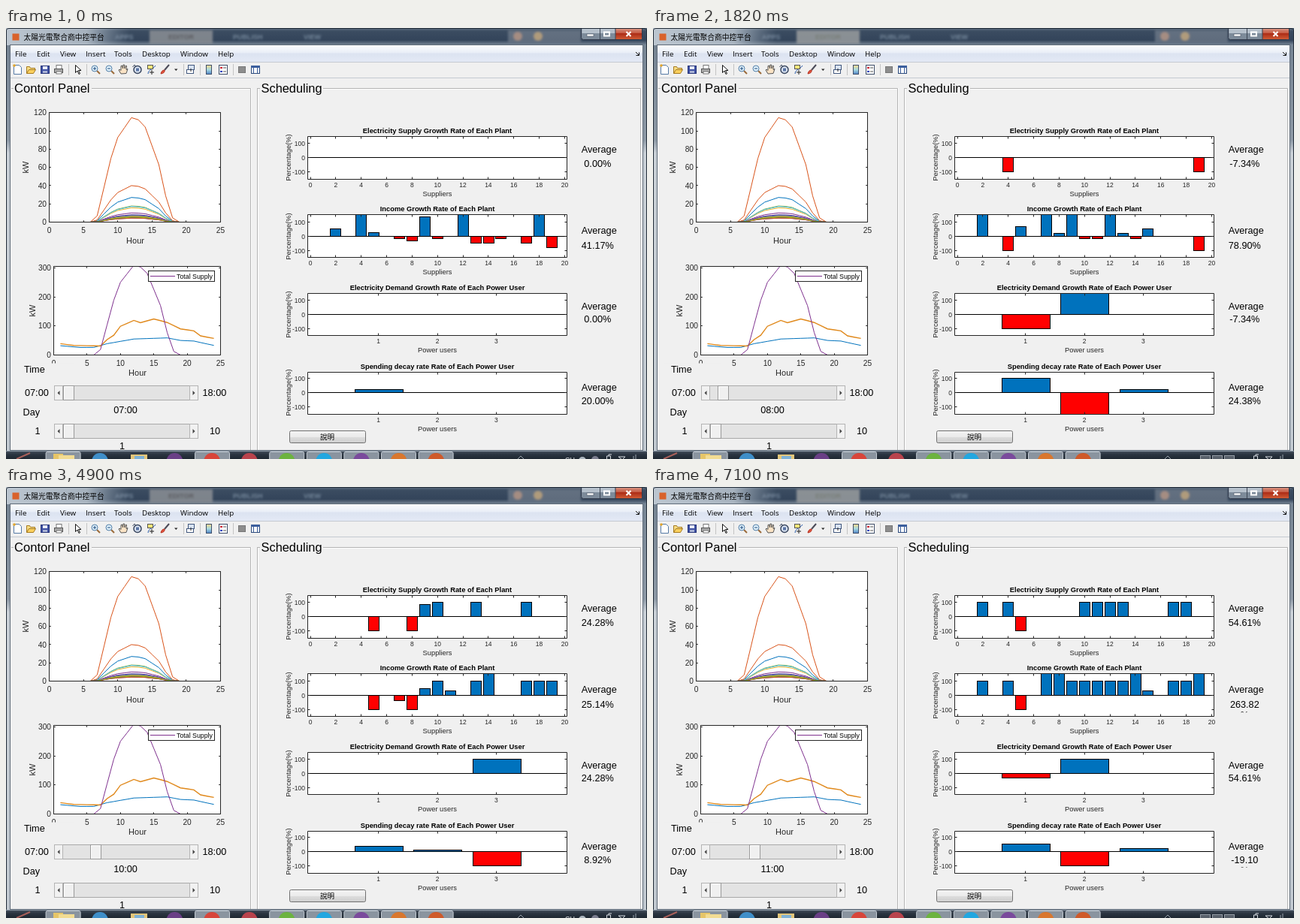
These frames come from a looping animation (853x574 px, 8000 ms). An HTML page:

```html
<!DOCTYPE html>
<html lang="zh-Hant">
<head>
<meta charset="utf-8">
<title>太陽光電聚合商中控平台</title>
<style>
html, body { margin: 0; width: 100%; height: 100%; overflow: hidden; background: #f0f0f0; }
svg { display: block; width: 853px; height: 574px; font-family: "Liberation Sans", Arial, sans-serif; }
.ui { font-family: "Open Sans", sans-serif; }
.cjk { font-family: "Noto Sans CJK TC", "Noto Sans CJK", "Noto Sans CJK JP", sans-serif; }
</style>
</head>
<body>
<svg id="stage" viewBox="0 0 853 574" xmlns="http://www.w3.org/2000/svg"></svg>
<script>
const LOOP = 8000, FIRST = 500, HOLD = 2200;
const COLORS = ['#0072bd', '#d95319', '#edb120', '#7e2f8e', '#77ac30', '#4dbeee', '#a2142f'];
const INK = '#262626', FULL = 100, OVER = 150;

// Same percentage for several bars.
const all = (v, ...ids) => Object.fromEntries(ids.map(i => [i, v]));

// One entry per hour; income follows supply except where "extra" differs.
const HOURS = [
  { supply: {}, demand: {}, spend: { 1: 20 },
    extra: { 2: 50, 5: 25, 8: -34, 9: 135, 19: -77, ...all(OVER, 4, 12, 18), ...all(-18, 7, 10, 15), ...all(-47, 13, 14, 17) },
    avg: [0, 41.17, 20] },
  { supply: all(-FULL, 4, 19), demand: { 1: -FULL, 2: OVER }, spend: { 1: FULL, 2: -OVER, 3: 20 },
    extra: { 5: 66, 15: 50, ...all(22, 8, 13), ...all(OVER, 2, 7, 9, 12), ...all(-18, 10, 11, 14) },
    avg: [-7.34, 78.9, 24.38] },
  { supply: { ...all(-FULL, 2, 7, 11, 14, 19), ...all(FULL, 8, 9) }, demand: { 1: FULL, 3: -FULL },
    spend: { 1: -FULL, 2: 30, 3: FULL }, extra: { 5: FULL }, avg: [61.22, 116.3, -13.52] },
  { supply: { ...all(-FULL, 5, 8), 9: 83, ...all(FULL, 10, 13, 17) }, demand: { 3: FULL },
    spend: { 1: 38, 2: 13, 3: -FULL }, extra: { 7: -38, 9: 47, 11: 33, 14: OVER, ...all(FULL, 18, 19) },
    avg: [24.28, 25.14, 8.92] },
  { supply: { ...all(FULL, 2, 4, 10, 11, 12, 13, 17, 18), 5: -FULL }, demand: { 1: -30, 2: FULL },
    spend: { 1: 54, 2: -FULL, 3: 20 }, extra: { ...all(OVER, 7, 8, 14, 19), 9: FULL, 15: 33 },
    avg: [54.61, 263.82, -19.1] }
];

// Key points over the day, [hour, value], joined by straight lines.
const SUN = [[6, 0], [7, .06], [9, .61], [10, .81], [12, 1], [13, .98], [14, .91], [16, .55], [17, .25], [18, .04], [19, 0]];
const USE_A = [[1, 32], [4, 26], [6, 26], [8, 39], [12, 55], [17, 59], [19, 50], [21, 48], [24, 33]];
const USE_B = [[1, 39], [3, 33], [7, 31], [8, 53], [9, 68], [10, 99], [12, 119], [13, 111], [15, 124], [17, 112], [19, 90], [21, 83], [22, 66], [24, 57]];

function along(keys, h) {
  const i = keys.findIndex(k => k[0] >= h);
  if (i < 1) return i ? 0 : keys[0][0] === h ? keys[0][1] : 0;
  const [a, u] = keys[i - 1], [b, v] = keys[i];
  return u + (v - u) * (h - a) / (b - a);
}

const rect = (x, y, w, h, fill, more = '') => `<rect x="${x}" y="${y}" width="${w}" height="${h}" fill="${fill}" ${more}/>`;
const path = (d, stroke, more = '') => `<path d="${d}" fill="none" stroke="${stroke}" ${more}/>`;
const dot = (x, y, r, fill, more = '') => `<circle cx="${x}" cy="${y}" r="${r}" fill="${fill}" ${more}/>`;
const text = (x, y, size, s, anchor = 'start', more = '') =>
  `<text x="${x}" y="${y}" font-size="${size}" text-anchor="${anchor}" ${more}>${s}</text>`;
const label = (x, y, size, s, anchor = 'middle') => text(x, y, size, s, anchor, `fill="${INK}"`);
const upright = (x, y, size, s) => `<g transform="translate(${x} ${y}) rotate(-90)">${label(0, 0, size, s)}</g>`;
const grad = (id, stops, x2 = 0) => `<linearGradient id="${id}" x1="0" y1="0" x2="${x2}" y2="${1 - x2}">` +
  stops.map(([o, c]) => `<stop offset="${o}" stop-color="${c}"/>`).join('') + '</linearGradient>';
const clip = (id, x, y, w, h) => `<clipPath id="${id}">${rect(x, y, w, h, '#000')}</clipPath>`;
const steps = (from, to, by, f) => {
  const out = [];
  for (let v = from; v <= to; v += by) out.push([f(v), v]);
  return out;
};

// Box with inward ticks; xs and ys hold [position, label].
function axes(x, y, w, h, xs, ys, size, tick, drop) {
  const r = x + w, b = y + h, px = v => Math.floor(v) + .5;
  let d = `M${x} ${y}H${r}V${b}H${x}Z`, labels = '';
  for (const [p, s] of xs) {
    d += `M${px(p)} ${b}v${-tick}M${px(p)} ${y}v${tick}`;
    labels += label(p, b + drop, size, s);
  }
  for (const [p, s] of ys) {
    d += `M${x} ${px(p)}h${tick}M${r} ${px(p)}h${-tick}`;
    labels += label(x - 3.5, p + size * .36, size, s, 'end');
  }
  return path(d, INK) + labels;
}

// Chart over 25 hours; series are [keys, scale, colour, width].
function dayChart(x, y, w, h, unit, max, by, series, id) {
  const X = v => x + v * w / 25, Y = v => y + h - v * unit;
  const curve = ([keys, k, color, width = 1]) => {
    const pts = steps(1, 24, 1, X).map(([p, t]) => p.toFixed(1) + ' ' + Y(k * along(keys, t)).toFixed(1));
    return path('M' + pts.join('L'), color, `stroke-width="${width}"`);
  };
  return rect(x, y, w, h, '#fff') + `<g clip-path="url(#${id})">${series.map(curve).join('')}</g>` +
    axes(x, y, w, h, steps(0, 25, 5, X), steps(0, max, by, Y), 10.2, 2.3, 14.5);
}

function leftCharts() {
  const peaks = [27, 114.5, 15.6, 10, 17.6, 17, 5.6, 4.8, 40];
  for (let i = peaks.length; i < 19; i++) peaks.push(4.4 + i * 7 % 5 * .9);
  const plants = peaks.map((p, i) => [SUN, p, COLORS[i % 7]]);
  const totals = [[USE_A, 1, COLORS[0]], [USE_B, 1, '#e0891c', 1.4], [SUN, 309, COLORS[3]]];
  return dayChart(57.5, 112.5, 228, 146, 1.215, 120, 20, plants, 'box1') +
    label(172, 287, 11, 'Hour') + upright(30, 185.5, 11, 'kW') +
    dayChart(63.5, 317.5, 222, 118, .387, 300, 100, totals, 'box2') +
    rect(189.5, 323.5, 88, 14, '#fff', `stroke="${INK}"`) + path('M192 330.5H225', COLORS[3]) +
    text(227, 333.8, 8.8, 'Total Supply') +
    label(175, 463, 11, 'Hour') + upright(39, 376.5, 11, 'kW') + rect(14, 446.5, 76, 17, '#f0f0f0');
}

const PLOTS = [
  { top: 144.5, h: 57, zero: 172.5, name: 'Electricity Supply Growth Rate of Each Plant', avgY: [166, 184.5] },
  { top: 248.5, h: 57, zero: 277.5, name: 'Income Growth Rate of Each Plant', avgY: [273.5, 294] },
  { top: 353.5, h: 56, zero: 381.5, name: 'Electricity Demand Growth Rate of Each Power User', avgY: [374.5, 391.5], users: true },
  { top: 458.5, h: 56, zero: 485.5, name: 'Spending decay rate Rate of Each Power User', avgY: [482.5, 500.5], users: true }
];
const barX = (p, i) => p.users ? 417.2 + i * 78.4 : 405 + i * 16.92;

function plotFrame(p) {
  const xs = p.users ? steps(1, 3, 1, v => barX(p, v)) : steps(0, 20, 2, v => barX(p, v));
  return axes(401.5, p.top, 345, p.h, xs, steps(-100, 100, 100, v => p.zero - v * .19), 8.5, 3, 10.6) +
    text(574, p.top - 5, 9.35, p.name, 'middle', 'font-weight="bold"') +
    label(574, p.top + p.h + 22.3, 9.35, p.users ? 'Power users' : 'Suppliers') +
    upright(379, p.zero, 9.35, 'Percentage(%)') + text(789.2, p.avgY[0], 12.7, 'Average', 'middle');
}

function plotBars(p, bars, i) {
  const w = p.users ? 64 : 14;
  const bar = ([k, v]) => {
    const x = Math.floor(barX(p, +k) - w * .49) + .5, size = Math.round(Math.abs(v) * .19);
    return rect(x, v > 0 ? p.zero - size : p.zero, w, size, v > 0 ? '#0072bd' : '#f00', 'stroke="#000"');
  };
  return `<g clip-path="url(#plot${i})">${Object.entries(bars).map(bar).join('')}</g>` + path(`M401.5 ${p.zero}H746.5`, '#000');
}

// A long number pushes its percent sign to a second, cut-off line.
function average(p, v, i) {
  const s = v.toFixed(2), y = p.avgY[1], put = (y, s, more) => text(787.3, y, 12.7, s, 'middle', more);
  return s.length < 6 ? put(y, s + '%') : put(y, s) + put(y + 14.2, '%', `clip-path="url(#avg${i})"`);
}

function slider(y, thumb) {
  const end = x => rect(x, y + .5, 11, 19, '#f1f1f1', 'stroke="#b4b4b4"');
  return rect(64.5, y + .5, 191, 19, '#e3e3e3', 'stroke="#a9a9a9"') + end(64.5) + end(244.5) +
    `<path d="M71.5 ${y + 7}v6l-3-3zM248.5 ${y + 7}v6l3-3z" fill="#444"/>` +
    rect(thumb + .5, y + .5, 14, 19, '#f0f0f0', 'stroke="#9a9a9a"') +
    path(`M${thumb + 1.5} ${y + 19}V${y + 1.5}H${thumb + 14}`, '#fff');
}

function toolbar() {
  const lens = (x, plus) => path(`M${x + 2} 57l4 4`, '#9a6a3a', 'stroke-width="2"') +
    dot(x - 1, 54, 4, '#dff0fb', 'stroke="#5580a8"') + path(`M${x - 3} 54h4` + (plus ? `M${x - 1} 52v4` : ''), '#234f80');
  const shape = (d, fill, stroke) => `<path d="${d}" fill="${fill}" stroke="${stroke}"/>`;
  return path([83, 107, 236, 258, 302].map(x => `M${x + .5} 48v15`).join(''), '#c4c4c4') +
    shape('M10.5 49.5h7l3 3v9h-10z', '#fff', '#567aa5') + dot(11, 50, 1.8, '#e2a52b') +
    shape('M27.5 60.5v-9h4l1 2h6v2', '#f7dc83', '#a57a21') + shape('M27.5 60.5l3-5h9l-3 5z', '#fbd05d', '#a57a21') +
    rect(46.5, 50.5, 11, 10, '#3f51a3', 'stroke="#27357a"') + rect(49, 51, 6, 4, '#e8ecf8') + rect(49, 57, 6, 3, '#a9b2d4') +
    rect(67, 49.5, 7, 5, '#fff', 'stroke="#777"') + rect(64.5, 54.5, 11, 5, '#aaa', 'stroke="#555"') + rect(67, 58, 7, 3, '#fff', 'stroke="#777"') +
    shape('M92.5 49.5v10l2.5-2.5 2 4.5 1.5-.7-2-4.3h3.5z', '#fff', '#111') + lens(119, true) + lens(138) +
    shape('M153 61l-3-5 1-1 2 1.5v-6l1.5-.5 1 4 .5-5h1.5l.5 5 1.5-4 1 .5-.5 5 2-1-2 6z', '#fbe3c5', '#555') +
    dot(175, 55.5, 5, '#dce5f2', 'stroke="#39465f" stroke-width="1.5"') + rect(173, 53.5, 4, 4, '#5d76a6') + path('M168.5 52l2.5-3 2 3', '#39465f') +
    path('M189 61c1-7 5-4 10-11', '#2458a8') + rect(188.5, 49.5, 7, 5, '#f7e87a', 'stroke="#555"') + path('M194 56v6M191 59h6', '#222') +
    path('M211 56l6-7', '#4b4b58', 'stroke-width="2"') + shape('M206 61q1-5 5-5q1 4-5 5z', '#e0553f', '#b53323') +
    '<path d="M224 54.5h4.5l-2.25 2.5z" fill="#222"/>' +
    rect(242.5, 49.5, 8, 6, '#d9e4f4', 'stroke="#42587e"') + rect(240.5, 55.5, 9, 5, '#fff', 'stroke="#42587e"') + path('M246 54v4', '#222') +
    rect(266.5, 49.5, 7, 12, 'url(#cbar)', 'stroke="#40506a"') +
    rect(283.5, 49.5, 11, 12, '#fff', 'stroke="#40506a"') + rect(285, 52, 3, 2, '#c23') + rect(285, 57, 3, 2, '#24b') + path('M289 53h4M289 58h4', '#555') +
    rect(309.5, 51.5, 9, 8, '#8d8d8d', 'stroke="#777"') +
    rect(326.5, 50.5, 11, 10, '#fff', 'stroke="#2c4a7c"') + rect(326, 50, 12, 3, '#3c5f9d') + path('M329.5 53v7M334.5 53v7', '#3c5f9d');
}

function chrome() {
  const menu = [[12, 'File'], [41, 'Edit'], [72, 'View'], [106, 'Insert'], [144, 'Tools'], [181, 'Desktop'], [232, 'Window'], [282, 'Help']];
  return rect(0, 0, 853, 574, 'url(#side)') + rect(0, 0, 853, 23, 'url(#title)') +
    '<g filter="url(#soft)" font-weight="bold" fill="#74879a">' +
    rect(668, 3, 97, 16, '#8b93a0', 'opacity=".5"') + dot(681, 11, 6, '#a58d82') + dot(708, 11, 6, '#b09b7c') +
    text(145, 15, 9, 'APPS') + text(302, 15, 9, 'PUBLISH') + text(396, 15, 9, 'VIEW') + '</g>' +
    '<g id="tab"></g>' + rect(0, 0, 165, 23, 'url(#glow)') +
    rect(8.5, 7.5, 9, 9, '#d9622b') + text(23.5, 15.6, 9.75, '太陽光電聚合商中控平台', 'start', 'class="cjk"') +
    rect(765.5, -3, 81, 18.5, '#7d8b9a', 'rx="3" stroke="#30394a"') + rect(766.5, 0, 44, 7, '#b5c0cb') +
    rect(811, 0, 35, 15, 'url(#close)') + path('M790.5 0V15M811 0V15', '#3c4654') +
    rect(773, 8, 9, 3, '#fff', 'stroke="#4b5564" stroke-width=".6"') + rect(796, 5.5, 7, 5, 'none', 'stroke="#fff" stroke-width="2"') +
    path('M825.5 5l6 6M831.5 5l-6 6', '#fff', 'stroke-width="2"') +
    rect(5.5, 22.5, 842, 540, '#f0f0f0', 'stroke="#5f6b78"') +
    rect(6, 23, 841, 22, 'url(#menu)') + path('M6 45.5H847M6 66.5H847', '#c5cad2') +
    menu.map(([x, s]) => text(x, 38, 9.8, s, 'start', 'class="ui"')).join('') +
    path('M838 32l4 4M842.5 32.5v4h-4', '#111') + toolbar() +
    path('M.5 574V3Q.5 .5 4 .5H849Q852.5 .5 852.5 3V574', '#26303b');
}

function taskbar() {
  const button = x => rect(x + .5, 564.5, 46, 14, '#8a949f', 'rx="2" stroke="#c6ced6"');
  const icons = ['#3f8fc9', '', '#6a3f86', '#d8453a', '#b9434c', '#6cb33f', '#22a7e0', '#7a4a9c', '#d9772e', '#cf5a2a'];
  return rect(0, 563, 853, 11, 'url(#task)') + path('M0 563.5H853', '#8c98a5') +
    path('M14 574l18-8', '#a9605a', 'stroke-width="2"') +
    [1, 5, 7, 8, 9, 10, 11].map(i => button(3 + i * 49.6)).join('') +
    rect(63, 567, 13, 8, '#e6c568') + rect(70, 569, 21, 6, '#f2dc93') +
    rect(166, 568, 22, 7, '#e3c67a') + rect(171, 570, 13, 4, '#7fb2d6') +
    icons.map((c, i) => c && dot(125 + i * 49.7, 577, 11, c)).join('') + '<g id="tray"></g>';
}

function trayIcons(meters) {
  const w = '#d5dae0';
  const left = meters
    ? [728, 744, 760].map(x => rect(x + .5, 569.5, 13, 8, '#59616b', 'stroke="#969da6"')).join('')
    : text(744, 578, 9, 'CH', 'start', 'fill="#e6e9ec"') + dot(767, 576, 5, '#aab4bd') + dot(784, 575, 5, '#7b7d8e');
  return left + path('M681 574l4-4 4 4', '#9ca6b0') + path('M799.5 574v-4h5v4M802 570v-2h4M815 571h9l-4 4z', w) + path('M835 574v-4M838 574v-6', '#9ba5ae');
}

function panels() {
  const frame = (x, gap, r) => path(`M${x - 3} 80.5H${x}M${gap} 80.5H${r}V562`, '#b3b3b3') + path(`M${gap} 81.5H${r - 1}M${r + 1} 80V562`, '#fff');
  return frame(10, 114, 325.5) + frame(338, 422, 844.5) + path('M334.5 80V562', '#b3b3b3') + path('M335.5 81V562', '#fff') +
    text(11, 86.3, 16.6, 'Contorl Panel') + text(339.5, 86.3, 16.4, 'Scheduling');
}

function controls() {
  const t = (x, y, s, a) => text(x, y, 12.7, s, a);
  return t(24, 458.7, 'Time') + t(25, 489.5, '07:00') + t(261.5, 489.5, '18:00') +
    t(22.5, 515.5, 'Day') + t(38.5, 540.5, '1') + t(271, 540.5, '10') + t(154.5, 561, '1', 'middle') + slider(527, 76) +
    rect(377.5, 536.5, 101, 16, 'url(#btn)', 'rx="2" stroke="#707070"') + text(427.5, 548.3, 9.6, '說明', 'middle', 'class="cjk"');
}

const defs = '<defs><filter id="soft" x="-20%" y="-50%" width="140%" height="200%"><feGaussianBlur stdDeviation="1.6"/></filter>' +
  grad('title', [[0, '#5d6d7f'], [.2, '#3b4c61'], [.7, '#33445a'], [1, '#7c8a99']]) +
  grad('side', [[0, '#71808f'], [.26, '#8d99a5'], [.29, '#c9d0d6'], [1, '#c0c8cf']]) +
  '<linearGradient id="glow"><stop stop-color="#bcc6d0"/><stop offset=".65" stop-color="#b2bdc8" stop-opacity=".9"/><stop offset="1" stop-color="#8898a8" stop-opacity="0"/></linearGradient>' +
  grad('close', [[0, '#d99a8a'], [.45, '#c65a43'], [.5, '#ad2d17'], [1, '#cf5a34']]) +
  grad('menu', [[0, '#fbfcfe'], [.45, '#e9eef7'], [.5, '#dce3f1'], [1, '#e3e9f5']]) +
  grad('btn', [[0, '#f3f3f3'], [.5, '#ebebeb'], [.51, '#dddddd'], [1, '#cfcfcf']]) +
  grad('cbar', [[0, '#f5d98a'], [.5, '#a9dbe0'], [1, '#4f83c8']]) +
  grad('task', [[0, '#4a5562'], [.4, '#2c3642'], [1, '#1e2731']]) +
  clip('box1', 57, 112, 229, 147) + clip('box2', 63, 317, 223, 119) +
  PLOTS.map((p, i) => clip('plot' + i, 401, p.top, 346, p.h) + clip('avg' + i, 760, p.avgY[1] + 2, 60, 4.2)).join('') + '</defs>';

const stage = document.getElementById('stage');
stage.innerHTML = defs + chrome() + panels() + leftCharts() +
  PLOTS.map(p => rect(401.5, p.top, 345, p.h, '#fff')).join('') +
  '<g id="bars"></g>' + PLOTS.map(plotFrame).join('') + '<g id="live"></g>' + controls() + taskbar();

const [tab, bars, live, tray] = ['tab', 'bars', 'live', 'tray'].map(id => document.getElementById(id));
let shown = -1;

function render(t) {
  const n = Math.max(0, Math.floor((t - FIRST) / HOLD) + 1);
  if (n === shown) return;
  shown = n;
  const { supply, extra, demand, spend, avg } = HOURS[n];
  const sets = [supply, { ...supply, ...extra }, demand, spend];
  const means = [avg[0], avg[1], avg[0], avg[2]];
  const clock = String(7 + n).padStart(2, '0') + ':00';
  tab.innerHTML = '<g filter="url(#soft)">' + rect(191, 3, 84, 18, n % 3 === 1 ? '#989d9e' : '#8a8f95', 'opacity=".85"') +
    text(233, 15, 9, 'EDITOR', 'middle', `font-weight="bold" fill="${n % 3 === 1 ? '#787d76' : '#5a5a5e'}"`) + '</g>';
  bars.innerHTML = PLOTS.map((p, i) => plotBars(p, sets[i], i)).join('');
  live.innerHTML = PLOTS.map((p, i) => average(p, means[i], i)).join('') +
    slider(476, Math.round(75.5 + 10.2 * n + .7 * n * n)) + text(159, 512.5, 12.7, clock, 'middle');
  tray.innerHTML = trayIcons(n % 3);
}

const start = performance.now();
function tick() {
  render((performance.now() - start) % LOOP);
  requestAnimationFrame(tick);
}
tick();
</script>
</body>
</html>
```
